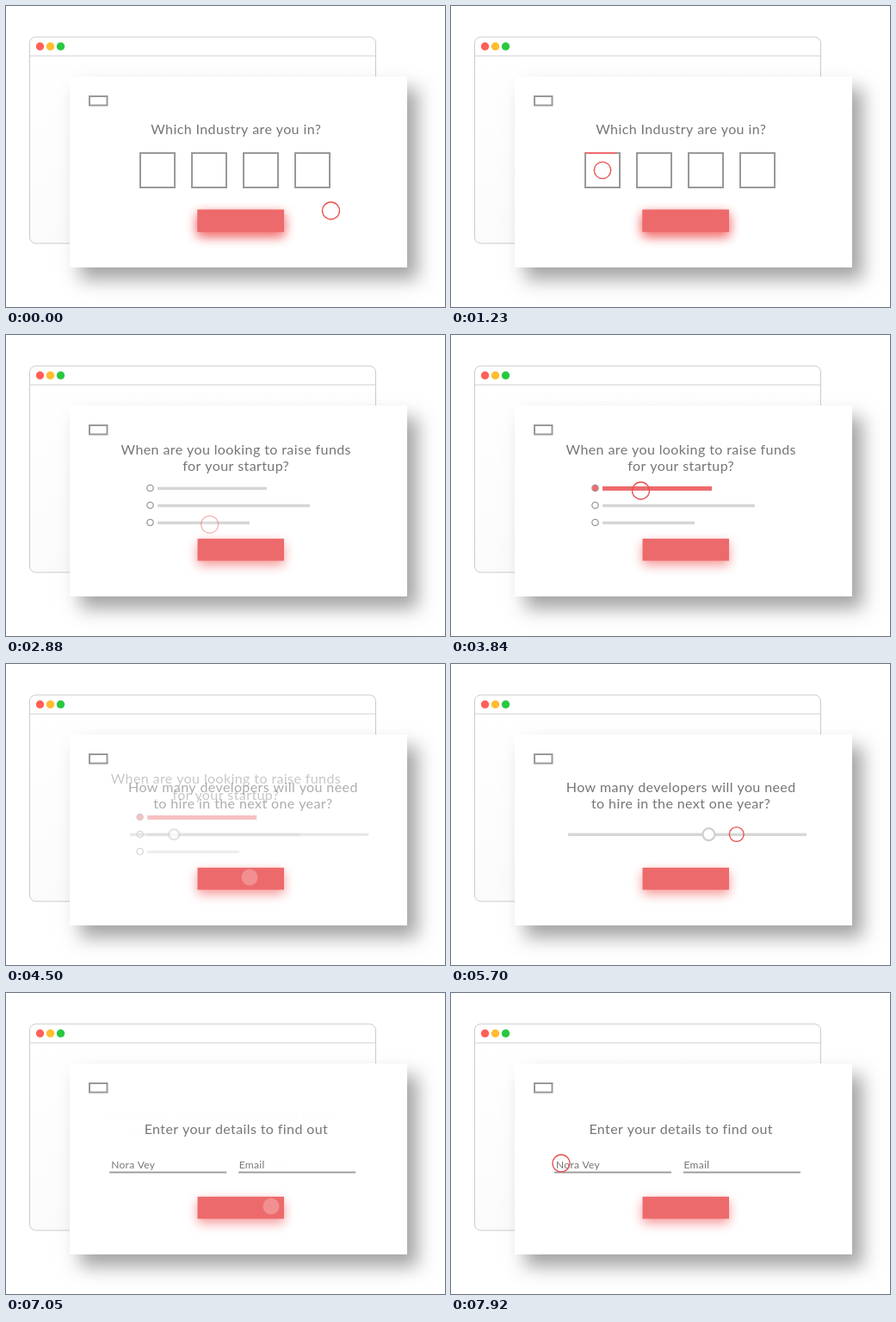
Animation, 510 px wide and 350 px high, one loop 8000 ms. Source, as an HTML page with a canvas:

```html
<!DOCTYPE html>
<html lang="en">
<head>
<meta charset="utf-8">
<title>Onboarding form</title>
<style>
  html, body { margin: 0; width: 100%; height: 100%; overflow: hidden; background: #fff; }
  canvas { display: block; }
</style>
</head>
<body>
<canvas id="stage" width="510" height="350"></canvas>
<script>
const ctx = document.getElementById('stage').getContext('2d');
const LOOP = 8000;
const RED = '#ed6a6c', GRAY = '#999', LIGHT = '#d6d6d6', TEXT = '#757575';

const clamp = v => Math.min(1, Math.max(0, v));
const span = (t, a, b) => clamp((t - a) / (b - a));
const ease = u => (1 - Math.cos(Math.PI * u)) / 2;
const move = (t, a, b) => ease(span(t, a, b));
const mix = (a, b, u) => a + (b - a) * u;

// Moves of the pointer: start, end, x, y, over the button
const PATH = [
  [0, 1, 377.5, 238, 0],
  [560, 1110, 176, 191, 0],
  [1670, 2100, 248, 248, 1],
  [2690, 3120, 220.5, 181, 0],
  [3840, 4250, 283, 248, 1],
  [4760, 5220, 187, 198, 0],
  [5236, 5788, 341, 198, 0],
  [6000, 6660, 308, 248, 1],
  [7150, 7920, 128, 198, 0]
];

// Start and end of the change to the next question
const TURNS = [[2095, 2560], [4250, 4700], [6650, 7080]];

function rect(x, y, w, h, color) {
  ctx.fillStyle = color;
  ctx.fillRect(x, y, w, h);
}

function circle(x, y, r, fill, stroke, width) {
  ctx.beginPath();
  ctx.arc(x, y, r, 0, Math.PI * 2);
  if (fill) { ctx.fillStyle = fill; ctx.fill(); }
  if (stroke) { ctx.strokeStyle = stroke; ctx.lineWidth = width; ctx.stroke(); }
}

function frame(x, y, w, h, color) {
  ctx.strokeStyle = color;
  ctx.lineWidth = 2;
  ctx.strokeRect(x, y, w, h);
}

function label(str, x, y, size, spacing, align) {
  ctx.font = `${size}px Lato, sans-serif`;
  ctx.letterSpacing = spacing + 'px';
  ctx.textAlign = align;
  ctx.fillStyle = TEXT;
  ctx.fillText(str, x, y);
}

function heading(y, ...lines) {
  lines.forEach((str, i) => label(str, 267.2, y + i * 19.2, 16, 0.4, 'center'));
}

function withShadow(color, dx, dy, blur, draw) {
  ctx.save();
  ctx.shadowColor = color;
  ctx.shadowOffsetX = dx;
  ctx.shadowOffsetY = dy;
  ctx.shadowBlur = blur;
  draw();
  ctx.restore();
}

function button() {
  withShadow('rgba(240,80,80,.6)', 0, 5, 13, () => rect(222.5, 236.8, 100.5, 25.7, RED));
}

function backdrop() {
  rect(0, 0, 510, 350, '#fff');
  ctx.beginPath();
  ctx.roundRect(27.5, 36, 402, 240, 7);
  const body = ctx.createLinearGradient(0, 58, 0, 276);
  body.addColorStop(0, '#fff');
  body.addColorStop(1, '#fbfbfb');
  ctx.fillStyle = body;
  ctx.fill();
  ctx.strokeStyle = '#ccc';
  ctx.lineWidth = 1;
  ctx.stroke();
  rect(28, 57.5, 401, 1, '#d2d2d2');
  ['#ff5f57', '#febc2e', '#28c840'].forEach((c, i) => circle(39.5 + i * 12, 47, 4.7, c));

  withShadow('rgba(0,0,0,.36)', 12, 14, 20, () => rect(74, 82, 392, 222, '#fff'));
  frame(97, 105, 20.5, 10.5, GRAY);
}

function industry(t) {
  heading(148.5, 'Which Industry are you in?');
  const drawn = span(t, 1080, 1400) ** 2;
  for (let i = 0; i < 4; i++) {
    if (i || drawn < 1) frame(156 + i * 60, 171, 40, 40, GRAY);
  }
  if (drawn > 0) {
    ctx.setLineDash(drawn < 1 ? [160 * drawn, 160] : []);
    frame(156, 171, 40, 40, RED);
    ctx.setLineDash([]);
  }
  button();
}

function funding(t) {
  heading(138.5, 'When are you looking to raise funds', 'for your startup?');
  const fill = move(t, 3080, 3520);
  [127, 177, 107].forEach((w, i) => {
    const y = 178 + i * 20;
    const done = i ? 0 : w * fill;
    circle(167.5, y, 3.7, '#fff', GRAY, 1.3);
    if (!i && fill > 0) circle(167.5, y, 3.3 * clamp(fill * 3), RED);
    rect(176 + done, y - 1.3, w - done, 3.5, LIGHT);
    rect(176, y - 2, done, 5, RED);
  });
}

function hiring(t) {
  heading(148.5, 'How many developers will you need', 'to hire in the next one year?');
  const x = mix(187, 335.5, move(t, 5236, 5928));
  const r = 6 + span(t, 5180, 5260) - span(t, 5930, 6010);
  rect(136, 196.6, x - r - 136, 3.5, LIGHT);
  rect(x + r, 196.6, 413 - x - r, 3.5, LIGHT);
  circle(x, 198.2, r, '#fff', '#d0d0d0', 2.3);
}

function details() {
  heading(163.5, 'Enter your details to find out');
  label('Nora Vey', 122, 203.5, 12, 0.3, 'left');
  label('Email', 270.5, 203.5, 12, 0.3, 'left');
  rect(120, 207.6, 136, 1.9, GRAY);
  rect(270, 207.6, 136, 1.9, GRAY);
}

const PAGES = [industry, funding, hiring, details];

function pages(t) {
  PAGES.forEach((draw, i) => {
    const enter = i ? move(t, ...TURNS[i - 1]) : 1;
    const leave = i < TURNS.length ? move(t, ...TURNS[i]) : 0;
    const alpha = enter * (1 - leave);
    if (alpha < 0.005) return;
    ctx.save();
    ctx.globalAlpha = alpha;
    ctx.translate(20 * (1 - enter) - 20 * leave, 0);
    draw(t);
    ctx.restore();
  });
}

function pointer(t) {
  let [, , x, y, over] = PATH[0];
  let r = 10;
  PATH.slice(1).forEach(([a, b, px, py, on], i) => {
    const u = move(t, a, b);
    x = mix(x, px, u);
    y = mix(y, py, u);
    over = mix(over, on, u);
    // Short press on arrival, except at the drag and the last stop
    if (i < 4 || i === 6) r -= 2 * Math.sin(Math.PI * span(t, b - 70, b + 130));
  });
  r -= 1.6 * (span(t, 5160, 5250) - span(t, 5930, 6020));
  ctx.save();
  ctx.globalAlpha = over;
  circle(x, y, r - 0.5, 'rgba(255,255,255,.25)');
  ctx.globalAlpha = 1 - over;
  circle(x, y, r, null, '#e8504f', 1.3);
  ctx.restore();
}

function render(now) {
  const t = now % LOOP;
  backdrop();
  button();
  pages(t);
  pointer(t);
}

const start = performance.now();
function tick() {
  render(performance.now() - start);
  requestAnimationFrame(tick);
}
tick();
</script>
</body>
</html>
```
